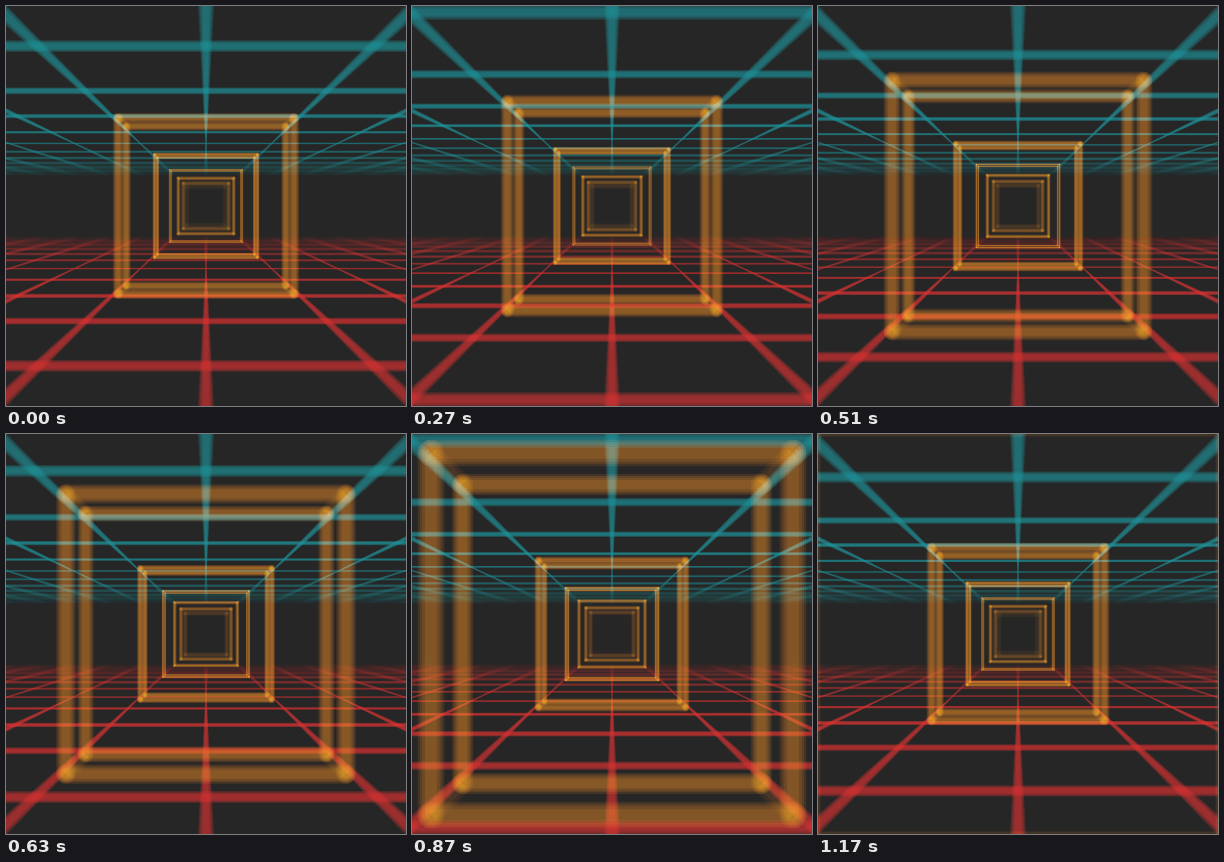
An HTML page with a canvas for the animation above (1.2 s loop, 400 by 400 pixels).

```html
<!DOCTYPE html>
<html lang="en">
<head>
<meta charset="utf-8">
<title>Neon tunnel</title>
<style>
html, body { margin: 0; width: 100%; height: 100%; overflow: hidden; background: #262626; }
canvas { display: block; width: 400px; height: 400px; }
</style>
</head>
<body>
<canvas id="stage" width="400" height="400"></canvas>
<script>
const ctx = document.getElementById('stage').getContext('2d');

const LOOP = 1200, STEP = 30;
const FLOOR = 411;       // floor offset from the horizon at depth 1
const RAIL_GAP = 1.05;   // sideways spacing of the rails, in floor heights
const BOX = 248;         // half size of a box at depth 1
const BOX_DEPTH = 0.29;
const FOCUS = 6.5, APERTURE = 37;
const FOG_START = 5, FOG_END = 13.5;
const TEAL = '30,144,151', RED = '213,50,50', ORANGE = '205,95,0';
const LAYERS = [1.18, 0.97, 0.77, 0.52];  // stacked widths give soft edges

const blur = z => 1.2 + APERTURE * Math.abs(1 / z - 1 / FOCUS);
const fog = z => Math.min(1, Math.max(0, (FOG_END - z) / (FOG_END - FOG_START)));
const opacity = (z, near, sharp) =>
  fog(z) * (near + (sharp - near) / (1 + (blur(z) - 1) / 4));
const gridOpacity = z => opacity(z, 0.6, 0.86);
const boxOpacity = z => opacity(z, 0.45, 0.8);
const paint = (rgb, alpha) =>
  `rgba(${rgb},${1 - Math.pow(1 - alpha, 1 / LAYERS.length)})`;

function softLine(x1, y1, x2, y2, width) {
  for (const layer of LAYERS) {
    ctx.lineWidth = width * layer;
    ctx.beginPath();
    ctx.moveTo(x1, y1);
    ctx.lineTo(x2, y2);
    ctx.stroke();
  }
}

// Line running away from the viewer; its blur is linear on each side of the focus.
function softRail(slope, gradient) {
  const length = Math.hypot(1, slope);
  const knots = [FLOOR / FOG_END, FLOOR / FOCUS, 430];
  ctx.fillStyle = gradient;
  for (const layer of LAYERS) {
    const side = sign => d => {
      const half = sign * layer * blur(FLOOR / d) / 2 / length;
      return [slope * d + half, d - slope * half];
    };
    ctx.beginPath();
    for (const point of [...knots.map(side(1)), ...knots.map(side(-1)).reverse()]) {
      ctx.lineTo(...point);
    }
    ctx.fill();
  }
}

function drawPlane(rgb, flip, progress) {
  ctx.save();
  ctx.scale(1, flip);
  const gradient = ctx.createLinearGradient(0, 0, 0, 200);
  for (let i = 0; i <= 20; i++) {
    const z = FLOOR / Math.max(i * 10, 1);
    gradient.addColorStop(i / 20, paint(rgb, gridOpacity(z)));
  }
  for (let k = -8; k <= 8; k++) softRail(k * RAIL_GAP, gradient);

  ctx.lineCap = 'butt';
  for (let z = 2.57 - 2 * progress + 12; z > 1.5; z--) {
    ctx.strokeStyle = paint(rgb, gridOpacity(z));
    softLine(-200, FLOOR / z, 200, FLOOR / z, blur(z));
  }
  ctx.restore();
}

function drawBox(front) {
  const back = front + BOX_DEPTH;
  const corners = [[-1, -1], [1, -1], [1, 1], [-1, 1]];
  ctx.lineCap = 'round';
  for (const z of [back, front]) {
    const size = BOX / z;
    ctx.strokeStyle = paint(ORANGE, boxOpacity(z));
    corners.forEach(([x, y], i) => {
      const [nx, ny] = corners[(i + 1) % 4];
      softLine(x * size, y * size, nx * size, ny * size, blur(z));
    });
  }
  const a = BOX / front, b = BOX / back;
  ctx.lineCap = 'butt';
  ctx.strokeStyle = paint(ORANGE, boxOpacity(back) * 0.4);
  for (const [x, y] of corners) softLine(x * a, y * a, x * b, y * b, blur(back));
}

function draw(progress) {
  ctx.setTransform(1, 0, 0, 1, 0, 0);
  ctx.globalCompositeOperation = 'source-over';
  ctx.fillStyle = '#262626';
  ctx.fillRect(0, 0, 400, 400);
  ctx.translate(200, 200);
  drawPlane(TEAL, -1, progress);
  drawPlane(RED, 1, progress);

  ctx.globalCompositeOperation = 'screen';
  for (let i = 6; i >= 0; i--) drawBox(2 * (1.41 - progress + i));
}

const start = performance.now();
function tick() {
  const time = (performance.now() - start) % LOOP;
  draw(Math.floor(time / STEP) * STEP / LOOP);
  requestAnimationFrame(tick);
}
tick();
</script>
</body>
</html>
```
